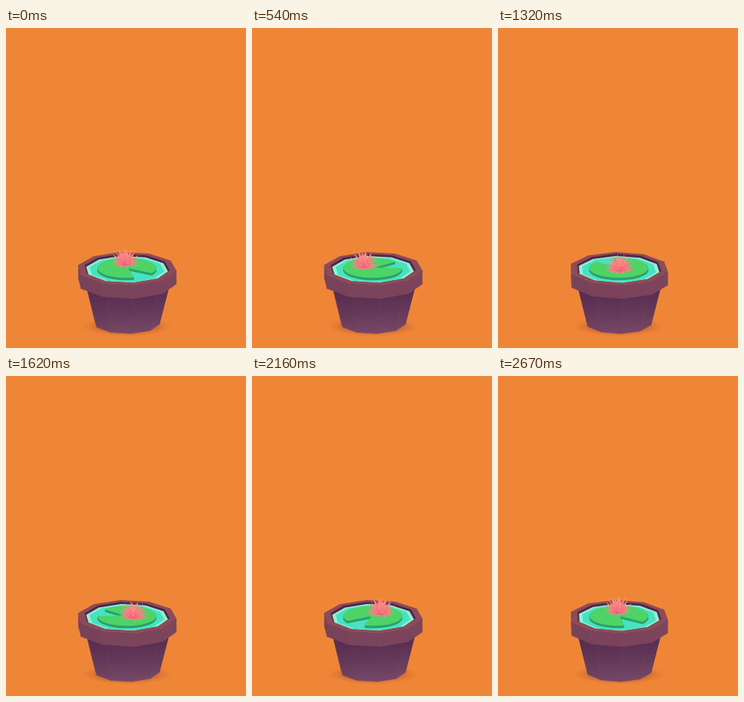
An HTML page with a canvas for the animation above (2.7 s loop, 300x400 px).

```html
<!DOCTYPE html>
<html lang="en">
<head>
<meta charset="utf-8">
<title>Water lily</title>
<style>
html, body { margin: 0; width: 100%; height: 100%; overflow: hidden; background: #ef8637; }
canvas { display: block; width: 300px; height: 400px; }
</style>
</head>
<body>
<canvas id="stage" width="300" height="400"></canvas>
<script>
const ctx = document.getElementById('stage').getContext('2d');
const LOOP = 2700, STEP = 30, TAU = Math.PI * 2, SIDES = 10;
const CENTER = { x: 151, y: 299.5 }, FLAT = 0.335, DEPTH = 0.0009, RISE = 0.94;
const rad = deg => deg * Math.PI / 180;

// Ground-plane point (x, z) at a drop below the rim, seen in mild perspective.
function project(x, z, drop = 0) {
  const scale = 1 + z * DEPTH;
  return [CENTER.x + x * scale, CENTER.y + z * FLAT * scale + drop];
}

const polar = (r, a, drop) => project(r * Math.cos(a), r * Math.sin(a), drop);

function trace(points) {
  ctx.beginPath();
  points.forEach(([x, y]) => ctx.lineTo(x, y));
  ctx.closePath();
}

function poly(points, fill, edge) {
  trace(points);
  ctx.fillStyle = fill;
  ctx.fill();
  if (edge) {
    ctx.strokeStyle = edge;
    ctx.lineWidth = 0.5;
    ctx.stroke();
  }
}

function ramp([x0, y0], [x1, y1], ...colors) {
  const g = ctx.createLinearGradient(x0, y0, x1, y1);
  colors.forEach((c, i) => g.addColorStop(i / (colors.length - 1), c));
  return g;
}

const corner = (turn, i) => turn + rad(10) + TAU * i / SIDES;
const decagon = (r, turn, drop) =>
  Array.from({ length: SIDES }, (_, i) => polar(r, corner(turn, i), drop));

function drawWall(turn, top, bottom, fill) {
  for (let i = 0; i < SIDES; i++) {
    const a = corner(turn, i), b = corner(turn, i + 1), normal = (a + b) / 2;
    if (Math.sin(normal) < -0.2) continue;
    const face = [polar(top.r, a, top.drop), polar(top.r, b, top.drop),
      polar(bottom.r, b, bottom.drop), polar(bottom.r, a, bottom.drop)];
    poly(face, fill, fill);
    poly(face, `rgba(60,25,60,${0.04 - 0.04 * Math.cos(normal)})`);
  }
}

function drawShadow() {
  ctx.save();
  ctx.translate(CENTER.x, 373);
  ctx.scale(1, 0.22);
  const g = ctx.createRadialGradient(0, 0, 34, 0, 0, 58);
  g.addColorStop(0, 'rgba(150,65,40,.4)');
  g.addColorStop(1, 'rgba(200,95,40,0)');
  ctx.fillStyle = g;
  ctx.fillRect(-60, -60, 120, 120);
  ctx.restore();
}

function drawPot(turn) {
  const lip = { r: 62, drop: 0 }, foot = { r: 62, drop: 17 };
  const neck = { r: 54, drop: 17 }, base = { r: 41, drop: 68.5 };
  drawShadow();
  drawWall(turn, neck, base, ramp([0, 328], [0, 382], '#572d51', '#663a5a', '#7a4a68'));
  drawWall(turn, lip, foot, '#7d465d');
  poly(decagon(lip.r, turn, 0), '#8c4b59');

  ctx.save();
  trace(decagon(54, turn, 0));
  ctx.clip();
  ctx.fillStyle = '#4d2545';
  ctx.fillRect(80, 270, 140, 60);
  poly(decagon(52, turn, 2), '#93f0d3');
  poly(decagon(47.5, turn, 2), '#47e2c2');
  ctx.restore();
}

function drawPad(turn) {
  const notch = rad(55) + turn, gap = rad(21), arcs = 30;
  const outline = drop => {
    const points = [polar(3, notch, drop)];
    for (let i = 0; i <= arcs; i++) {
      points.push(polar(37, notch + gap + (TAU - 2 * gap) * i / arcs, drop));
    }
    return points;
  };
  for (let drop = 3; drop > 0; drop -= 0.5) poly(outline(drop), '#2aa26a');
  poly(outline(0), '#4dd366');
}

function drawFlower(turn) {
  const orbit = rad(-100) + turn;
  const cx = 11.5 * Math.cos(orbit), cz = 11.5 * Math.sin(orbit);
  const petals = [];
  for (let ring = 0; ring < 4; ring++) {
    const count = 13 - 2 * ring, lift = rad(8 + 22 * ring);
    const length = 19 + 3 * Math.sin(Math.PI * ring / 3);
    for (let i = 0; i < count; i++) {
      const a = turn + TAU * (i + ring * 0.4) / count;
      petals.push({ a, lift, length, depth: Math.sin(a) * Math.cos(lift) });
    }
  }
  petals.sort((p, q) => p.depth - q.depth);

  for (const { a, lift, length } of petals) {
    const at = (distance, side) => {
      const out = distance * Math.cos(lift), up = distance * Math.sin(lift);
      return project(cx + out * Math.cos(a) - side * Math.sin(a),
        cz + out * Math.sin(a) + side * Math.cos(a), -up * RISE);
    };
    const root = at(0, 0), tip = at(length, 0), left = at(length / 2, 2.7), right = at(length / 2, -2.7);
    poly([root, left, tip, right], ramp(root, tip, '#f9567f', '#fb7f82', '#ff9d8c'));
    poly([root, left, tip], 'rgba(225,75,100,.15)');
  }
}

function frame(now) {
  const t = Math.floor((now % LOOP) / STEP) * STEP;
  const turn = -TAU * t / LOOP;
  ctx.fillStyle = '#ef8637';
  ctx.fillRect(0, 0, 300, 400);
  drawPot(turn);
  drawPad(turn);
  drawFlower(turn);
}

const start = performance.now();
function tick() {
  frame(performance.now() - start);
  requestAnimationFrame(tick);
}
tick();
</script>
</body>
</html>
```
